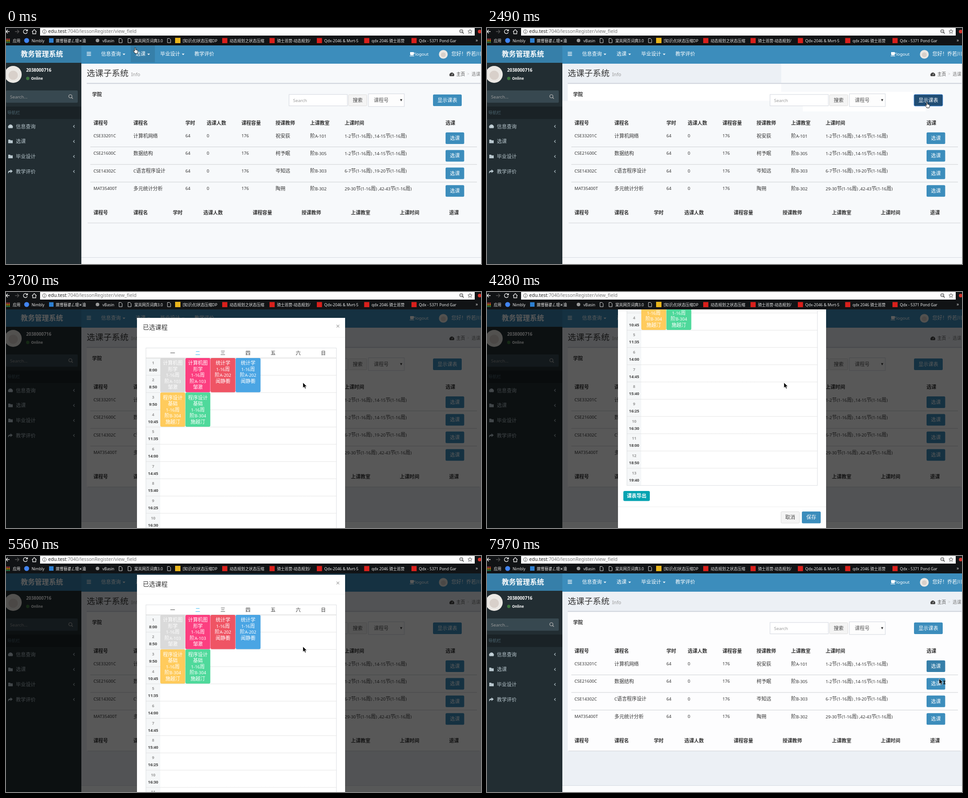
An HTML page that plays this animation: 1059x529 px, repeating every 8 s.

```html
<!DOCTYPE html>
<html lang="zh">
<head>
<meta charset="utf-8">
<title>选课</title>
<style>
html, body { margin: 0; width: 100%; height: 100%; overflow: hidden; background: #111; }
svg { display: block; width: 1059px; height: 529px; }
text { font-family: "Noto Sans", "Noto Sans CJK SC", "Noto Sans CJK", sans-serif; white-space: pre; }
</style>
</head>
<body>
<svg id="stage" viewBox="0 0 1059 529" xmlns="http://www.w3.org/2000/svg"></svg>
<script>
const BLUE = '#3c8dbc', DARK = '#367fa9', INK = '#333';

// y is the vertical centre; Latin runs inside Chinese text are set smaller unless even
function text(x, y, s, size, fill = INK, o = {}) {
  const mixed = !o.even && /[^\x00-\x7f]/.test(s)
    ? s.replace(/[\x20-\x7e]+/g, m => `<tspan font-size="${(size * .88).toFixed(2)}">${m}</tspan>`) : s;
  return `<text x="${x}" y="${(y + size * .37).toFixed(2)}" font-size="${size}" fill="${fill}"` +
    `${o.bold ? ' font-weight="700"' : ''}${o.mid ? ' text-anchor="middle"' : ''}>${mixed}</text>`;
}
function rect(x, y, w, h, fill, o = {}) {
  return `<rect x="${x}" y="${y}" width="${w}" height="${h}" fill="${fill}"` +
    `${o.r ? ` rx="${o.r}"` : ''}${o.line ? ` stroke="${o.line}"` : ''}${o.id ? ` id="${o.id}"` : ''}/>`;
}
const dot = (x, y, r, fill) => `<circle cx="${x}" cy="${y}" r="${r}" fill="${fill}"/>`;
const path = (d, stroke, w = 1.3, fill = 'none') =>
  `<path d="${d}" stroke="${stroke}" stroke-width="${w}" fill="${fill}"/>`;
const shape = (d, fill) => `<path d="${d}" fill="${fill}"/>`;
const group = (id, body) => `<g id="${id}">${body}</g>`;
const button = (x, y, w, h, label, id) =>
  rect(x, y, w, h, BLUE, { r: 2.5, id }) + text(x + w / 2, y + h / 2, label, 11, '#fff', { mid: 1 });
const plain = (x, y, w, h, label) =>
  rect(x + .5, y + .5, w - 1, h - 1, '#f4f4f4', { r: 2, line: '#ddd' }) +
  text(x + w / 2, y + h / 2, label, 11, '#444', { mid: 1 });
const lens = (x, y, c, r = 3.6) =>
  `<circle cx="${x}" cy="${y}" r="${r}" fill="none" stroke="${c}" stroke-width="1.4"/>` +
  path(`M${x + r * .7} ${y + r * .7}l3 3`, c, 1.7);
const folder = (x, y, c) => shape(`M${x} ${y - 4}h4l1.5 1.5h4.5v6.5h-10z`, c);
const gauge = (x, y, c) => shape(`M${x} ${y + 4}a5.3 5.3 0 1 1 9 0z`, c) +
  path(`M${x + 4.5} ${y + 2}l1.5 -4`, '#fff', .9);
const avatar = (x, y, r) => dot(x, y, r, '#ebe8e4') + dot(x, y + r * .1, r * .55, '#d8d0ca');

function browser() {
  let s = rect(0, 0, 1059, 39, '#111315') + rect(76, 0, 969, 17, '#fdfdfd');
  s += path('M8 8H0M4 4L0 8l4 4', '#eee') + path('M20 8h8M25 4l4 4l-4 4', '#555');
  s += group('reload', path('M47 5.5a4.5 4.5 0 1 0 .5 4M48 3v3.5h-3.5', '#eee', 1.4));
  s += group('stop', path('M39.5 4l8 8M47.5 4l-8 8', '#eee', 1.5));
  s += path('M58 8.5l5-5l5 5M59.5 8v5h7v-5', '#eee');
  s += '<circle cx="85.5" cy="8" r="4.2" fill="none" stroke="#555"/>' + path('M85.5 7.5v3M85.5 5.3v1', '#555', 1.1);
  s += text(94, 7.5, 'edu.test<tspan fill="#777">:7040/lessonRegister/view_field</tspan>', 10.6, '#222');
  s += lens(1015, 7, '#555', 3.4) + path('M1013.5 7h3', '#555', 1);
  s += path('M1034.5 3l1.3 3.2l3.4.3l-2.6 2.2l.8 3.3l-2.9-1.8l-2.9 1.8l.8-3.3l-2.6-2.2l3.4-.3z', '#555', 1);
  s += dot(1056, 8, 4, '#d8342c');

  ['#e8453c', '#f5b400', '#3aa757'].forEach((c, i) => {
    for (let j = 0; j < 3; j++) s += rect(-1 + j * 3.5, 24 + i * 3.5, 2.4, 2.4, c);
  });
  const mark = (x, label) => text(x, 28.5, label, 8.6, '#e8e8e8', { even: 1 });
  s += mark(15, '应用');
  s += dot(46, 28, 5.5, '#4285f4') + mark(57, 'Nimbly');
  s += rect(96, 23, 10, 10, '#2d7fd0') + mark(111, '鏉愭簮鍙ㄥ璁✕瀹');
  s += dot(204, 28, 4, '#999') + mark(215, 'vBasin');
  [252, 272, 360].forEach(x => s += path(`M${x} 23.5h4.5l2.5 2.5v7h-7z`, '#ddd', 1));
  s += mark(286, '棠岚网页词典3.0');
  s += rect(377, 22, 12, 12, '#e9b51c') + mark(394, '[知识点]状态压缩DP');
  ['动态规划之状态压缩', '骑士巡营-动态规划/', 'Qdx-2046 &amp; Mvrt-5', 'qdx 2046 骑士巡营', 'Qdx - 5371 Pond Gar']
    .forEach((label, i) => {
      const x = 482 + i * 105.5;
      s += rect(x, 22.5, 11.5, 11.5, '#d9201c') + mark(x + 16.5, label);
    });
  return s + text(1047, 27, '»', 10, '#ddd');
}

function topNav() {
  let s = rect(168, 39, 891, 41, BLUE) + rect(0, 39, 168, 39, DARK);
  s += rect(278, 39, 54, 38, DARK, { id: 'navHot' });
  s += text(33, 58, '教务管理系统', 15.7, '#fff', { bold: 1 });
  s += path('M180 54.5h9.5M180 58h9.5M180 61.5h9.5', '#fff', 1.7);
  [[212, '信息查询'], [289, '选课'], [344, '毕业设计'], [420, '教学评价']].forEach(([x, label], i) => {
    s += text(x, 58, label, 11, '#fff');
    const end = x + label.length * 11 + 4;
    if (i < 3) s += shape(`M${end} 57.5h6l-3 3.2z`, '#fff');
  });
  s += shape('M901 54h8v5a2 2 0 0 1-2 2h-4a2 2 0 0 1-2-2zM900 62h10v1.2h-10z', '#fff') + path('M909 55.5h1.5v2.5h-1.5', '#fff', 1);
  s += text(912, 58, 'logout', 9.8, '#fff') + avatar(975, 59, 9.8);
  return s + text(993, 58, '您好！乔若川', 11, '#fff');
}

function sidebar() {
  const c = '#b8c7ce';
  let s = rect(0, 78, 168, 451, '#222d32') + avatar(16, 104, 19);
  s += text(45, 94.5, '2038000716', 9.8, '#fff', { bold: 1 });
  s += dot(48.5, 113, 3.7, '#3c763d') + text(56, 113, 'Online', 7.9, '#fff', { bold: 1 });
  s += rect(0, 140, 160, 27.5, '#374850', { r: 2 }) + text(9, 154, 'Search...', 9.8, '#999') + lens(143.5, 153, '#aaa');
  s += rect(0, 176, 168, 28, '#1a2226') + text(3, 189.5, '导航栏', 9.4, '#4b646f');
  ['信息查询', '选课', '毕业设计', '教学评价'].forEach((label, i) => {
    const y = 220.5 + i * 33.7;
    s += text(22, y, label, 11, c) + path(`M153 ${y - 2.8}l-2.8 2.8l2.8 2.8`, c, 1.2);
    if (i == 0) s += gauge(5.5, y, c);
    else if (i < 3) s += folder(5, y, c);
    else s += shape(`M5 ${y + 5}c-1-6 1-7 5-7v-2.5l5 4l-5 4v-2.5c-3 0-4 1-5 4z`, c);
  });
  return s;
}

const BOLD = { bold: 1 };
function page() {
  let s = rect(168, 80, 891, 449, '#f7f9fb');
  s += group('patch', rect(168, 80, 488, 83.5, '#ecf0f5') + rect(180, 125, 476, 38.5, '#fff') +
    rect(630, 143, 320, 20.5, '#fff') + rect(704, 163, 274, 24, '#fff'));
  s += group('clean', rect(168, 80, 891, 449, '#ecf0f5') + rect(180, 125, 878, 312, '#fdfdfe') + rect(168, 514, 891, 15, '#fbfcfd'));
  s += text(180, 101.5, '选课子系统', 18.6) + text(279, 104, 'Info', 10.6, '#999');
  s += gauge(989.5, 104, '#444') + text(1004, 103, '主页', 9.7, '#444') + text(1028, 103, '&gt;', 8.5, '#bbb') + text(1038, 103, '选课', 9.7, '#777');
  s += rect(180, 123, 878, 2.3, '#d2d6de') + text(192, 149, '学院', 10.8, INK, BOLD);
  s += rect(631, 149, 130, 25.5, '#fff', { line: '#d2d6de' }) + text(640, 162, 'Search', 9.8, '#999');
  s += plain(763, 149, 42, 26, '搜索');
  s += rect(808, 147.5, 80, 28.5, '#fdfdfd', { line: '#d2d6de' }) + text(820, 162, '课程号', 11, '#555') + shape('M878.5 159.5h5l-2.5 5z', '#333');
  s += button(952, 149, 64, 26, '显示课表', 'show');

  const heads = ['课程号', '课程名', '学时', '选课人数', '课程容量', '授课教师', '上课教室', '上课时间'];
  const cols = [195, 284, 400, 447.5, 525, 601, 678, 755, 980];
  const cols2 = [195, 284, 372, 440, 550, 659, 769, 878, 988];
  [...heads, '选课'].forEach((h, i) => s += text(cols[i], 213, h, 10.8, INK, BOLD));
  [...heads, '退课'].forEach((h, i) => s += text(cols2[i], 414, h, 10.8, INK, BOLD));
  [
    ['CSE33201C', '计算机网络', '祝安荻', 'A-101', '1-2', '14-15'],
    ['CSE21600C', '数据结构', '柯予眠', 'B-305', '1-2', '14-15'],
    ['CSE14302C', 'C语言程序设计', '岑知远', 'B-303', '6-7', '19-20'],
    ['MAT35400T', '多元统计分析', '陶朔', 'B-302', '29-30', '42-43']
  ].forEach(([code, name, who, room, a, b], i) => {
    const y = 241.5 + i * 39.4;
    [code, name, '64', '0', '176', who, '阶' + room, `${a}节(1-16周) ,${b}节(1-16周)`]
      .forEach((v, k) => s += text(cols[k], y, v, /[^\x00-\x7f]/.test(v) ? 10.9 : 9.6));
    s += button(980, y - 7.5, 41.5, 26, '选课', 'pick' + i);
    if (i < 3) s += rect(188, y + 24.5, 862, 1, '#cdd0d3');
  });
  return s + rect(182, 436.5, 874, 1, '#cfd2d6') + rect(168, 514, 891, 1, '#d5dae0');
}

function menu() {
  return rect(278.5, 80.5, 122, 56, '#fff', { line: '#ddd' }) +
    text(294, 97, '专业选课', 11, '#777') + text(294, 119, '公共选课', 11, '#777');
}

// drawn with the dialog's top edge at zero
function dialog() {
  const ROW = 38.67, TOP = 90;
  let s = rect(292, 0, 464, 692, '#fff') + text(305, 21, '已选课程', 13.8);
  s += rect(735.5, 8, 8.5, 20, 'none', { line: '#9aa4b8', id: 'closeBox' });
  s += path('M737 15.5l6 6M743 15.5l-6 6', '#aaa', 1.2) + rect(292, 43, 464, 1, '#f4f4f4');
  s += rect(312, TOP, 32, ROW * 13, '#f5f7f8');
  [...'一二三四五六日'].forEach((d, i) =>
    s += text(371.5 + i * 56, 78.5, d, 11, i == 1 ? '#29b6f6' : INK, { mid: 1 }));
  '8:00 8:50 9:50 10:45 11:35 14:00 14:45 15:40 16:25 16:30 18:00 18:50 19:40'.split(' ').forEach((h, i) => {
    const y = TOP + i * ROW;
    s += text(328, y + 10.5, '' + (i + 1), 8.9, '#999', { bold: 1, mid: 1 }) + text(328, y + 26.5, h, 8.9, '#444', { bold: 1, mid: 1 });
    if (i) s += `<path d="M312 ${y}H736" stroke="#d8d8d8" stroke-dasharray="2 1"/>`;
  });
  s += rect(312, 67.5, 424.5, TOP + 13 * ROW - 67.5, 'none', { line: '#dcdfe2' }) + rect(312, TOP - .5, 424, 1, '#ccc');
  const graphics = ['计算机图', '形学', '1-16周', '阶A-103', '邹澈'];
  const stats = ['统计学', '1-16周', '阶A-202', '闻静蘅'];
  const coding = ['程序设计', '基础', '1-16周', '阶B-304', '施越汀'];
  [[0, 0, '#dadada', graphics], [1, 0, '#fc3f80', graphics], [2, 0, '#ef5464', stats], [3, 0, '#4aa5e4', stats],
   [0, 2, '#ffcb5c', coding], [1, 2, '#4fd99b', coding]].forEach(([c, r, fill, lines]) => {
    const x = 344 + c * 56, y = TOP + r * ROW;
    s += rect(x, y, 55.5, ROW * 2 - .6, fill, { r: 3 });
    lines.forEach((l, i) => s += text(x + 27.8, y + 11.3 + i * 13.5, l, 10.9, '#fff', { mid: 1 }));
  });
  s += rect(304, 605, 59, 22.5, '#05a3b1', { r: 3 }) + text(333.5, 616, '课表导出', 10.9, '#fff', { mid: 1, bold: 1 });
  return s + rect(292, 640, 464, 1, '#eee') + plain(655, 651, 42, 26.5, '取消') + button(702, 651, 42, 26.5, '保存');
}

const arrow = path('M0 0v12l2.8-2.5l2 4.3l2-.9l-1.9-4.2h3.8z', '#fff', .7, '#000');
const hand = path('M-1.2 1c0-1.4 2.2-1.4 2.2 0v4c2 0 5 .5 5 2.5c0 3-1 3.5-1.3 5.5h-5c-.7-2-3.5-4-3.7-5.5c0-1 1.5-1 2.8.5z', '#111', 1, '#fff');
const glass = path('M9.5 5h4.5M9.5 12h4.5M10 5l3.5 7M13.5 5l-3.5 7', '#111', 1.1);

document.getElementById('stage').innerHTML =
  page() + topNav() + sidebar() + group('menu', menu()) +
  rect(0, 39, 1059, 490, '#000', { id: 'shade' }) + group('dialog', dialog()) + browser() +
  group('cursor', group('arrow', arrow) + group('hand', hand) + group('glass', glass));

const $ = id => document.getElementById(id);
const show = (id, on) => $(id).setAttribute('display', on ? 'inline' : 'none');
const set = (id, k, v) => $(id).setAttribute(k, v);
const within = (t, a, b) => t >= a && t < b;

// fraction of a move made in n held steps, the first at a, the last at b
function steps(t, a, b, n) {
  if (t < a) return 0;
  return n < 2 ? 1 : Math.min(n, Math.floor((t - a) * (n - 1) / (b - a) + 1e-6) + 1) / n;
}

// start, end, steps, dx, dy
const MOVES = [
  [150, 820, 6, 22, 50], [1510, 1510, 1, 335, 51], [1790, 2350, 5, 336, 21], [2880, 3270, 4, -319, 37],
  [5860, 6760, 8, 78, -126], [7160, 7840, 6, 256, 168], [7970, 7970, 1, 12, 30]
];
// time, scroll offset
const SCROLL = [[0, 0], [3700, 4], [3850, 60], [3990, 125], [4130, 190], [4280, 221], [4650, 212], [4800, 180],
  [4950, 140], [5100, 102], [5260, 70], [5410, 42], [5560, 20], [5730, 0]];

function draw(t) {
  let x = 288, y = 44;
  for (const [a, b, n, dx, dy] of MOVES) {
    const f = steps(t, a, b, n);
    x += dx * f;
    y += dy * f;
  }
  const pointing = t < 1080 || within(t, 2350, 2880) || within(t, 6760, 6880) || within(t, 7840, 7970);
  set('cursor', 'transform', `translate(${x} ${y})`);
  show('hand', pointing);
  show('arrow', !pointing);
  show('glass', t >= 7970);

  show('menu', within(t, 280, 950));
  show('navHot', t < 1080);
  const loading = within(t, 950, 1510);
  show('reload', !loading);
  show('stop', loading);
  show('patch', t >= 1510);
  show('clean', t >= 2610);

  const clicked = within(t, 2490, 2610);
  set('show', 'fill', clicked ? '#204d74' : within(t, 2350, 2490) ? DARK : BLUE);
  set('show', 'stroke', clicked ? '#4a90e2' : 'none');
  set('pick0', 'fill', t >= 7840 ? DARK : BLUE);

  const open = within(t, 2610, 6880), entering = t < 2760;
  const offset = SCROLL.filter(k => k[0] <= t).pop()[1];
  show('shade', open);
  show('dialog', open);
  set('shade', 'opacity', entering ? .45 : .65);
  set('dialog', 'opacity', entering ? .7 : 1);
  set('dialog', 'transform', `translate(0 ${entering ? 36 : 62 - offset})`);
  show('closeBox', t >= 6760);
}

const begin = performance.now();
function tick() {
  draw((performance.now() - begin) % 8000);
  requestAnimationFrame(tick);
}
draw(0);
tick();
</script>
</body>
</html>
```
